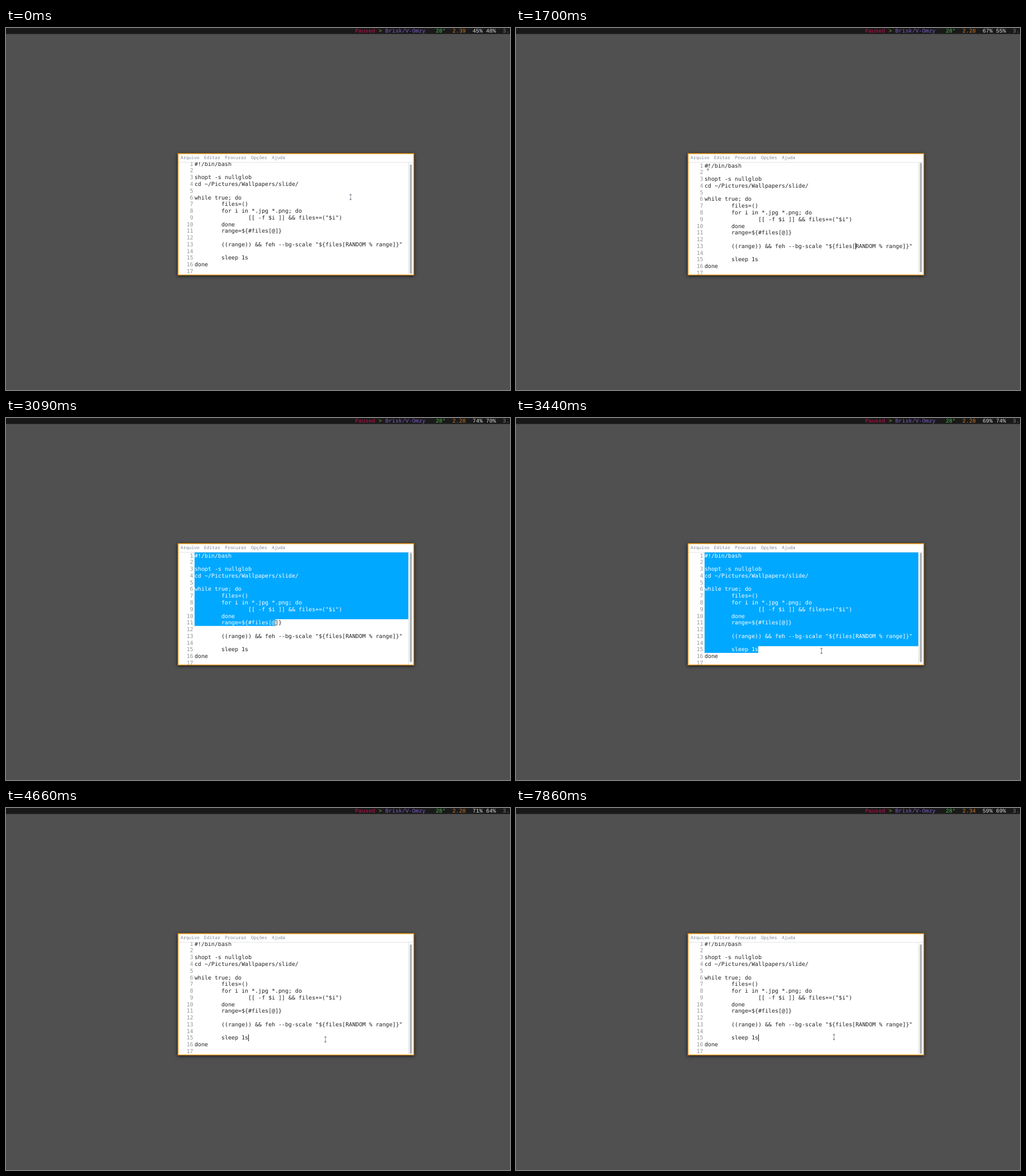
Write an HTML page with a canvas that moves like this. It is 882 by 635 pixels and loops after 8000 ms.

```html
<!DOCTYPE html>
<html lang="pt">
<head>
<meta charset="utf-8">
<title>Editor</title>
<style>
html, body { margin: 0; width: 100%; height: 100%; overflow: hidden; background: #505050; }
canvas { display: block; }
</style>
</head>
<body>
<canvas id="stage" width="882" height="635"></canvas>
<script>
const ctx = document.getElementById('stage').getContext('2d');
const LOOP = 8000;
const CODE_FONT = '9.75px "DejaVu Sans Mono", monospace';
const BAR_FONT = '9.78px "Liberation Mono", monospace';
const MENU_FONT = '7.85px "Noto Sans Mono", monospace';
const CELL = 5.87, LINE = 11.77, LEFT = 330, RIGHT = 704, TOP = 235.4;

const code = [
  '#!/bin/bash',
  '',
  'shopt -s nullglob',
  'cd ~/Pictures/Wallpapers/slide/',
  '',
  'while true; do',
  '        files=()',
  '        for i in *.jpg *.png; do',
  '                [[ -f $i ]] && files+=("$i")',
  '        done',
  '        range=${#files[@]}',
  '',
  '        ((range)) && feh --bg-scale "${files[RANDOM % range]}"',
  '',
  '        sleep 1s',
  'done',
  ''
];

const menu = [['Arquivo', 305.6], ['Editar', 346.6], ['Procurar', 383], ['Opções', 428.8], ['Ajuda', 465.2]];

// [time, load, cpu 1, cpu 2]
const stats = [
  [0, '2.39', 45, 48], [430, '2.39', 52, 51], [1430, '2.28', 67, 55], [2430, '2.28', 74, 70],
  [3440, '2.28', 69, 74], [4440, '2.28', 71, 64], [5430, '2.28', 63, 61],
  [6420, '2.34', 58, 66], [7430, '2.34', 59, 69]
];

// [time, x, y]
const path = [
  [110, 603, 296.5], [370, 594, 379], [690, 315.7, 262], [790, 320, 252], [1230, 320, 252],
  [1700, 335.8, 244.5], [2000, 330.8, 242], [2110, 330.8, 242], [2400, 334, 244],
  [2680, 360.5, 262], [2890, 405, 310], [3090, 471, 359], [3400, 530, 405],
  [3600, 552, 422], [3700, 555.5, 425], [3750, 555.5, 425], [3870, 559.7, 428],
  [4140, 559.7, 428], [4490, 559, 406], [5100, 559, 406], [5210, 559, 403.8],
  [5430, 559, 403.8], [5540, 558, 402.4], [5930, 558, 402.4], [5980, 557.4, 402],
  [7810, 557.4, 402], [7860, 556.5, 401.7]
];

const within = (t, a, b) => t >= a && t < b;

function pointerAt(t) {
  const i = path.findIndex(p => p[0] > t);
  if (i === 0) return path[0].slice(1);
  if (i < 0) return path[path.length - 1].slice(1);
  const [t0, x0, y0] = path[i - 1], [t1, x1, y1] = path[i];
  const k = (t - t0) / (t1 - t0);
  return [x0 + (x1 - x0) * k, y0 + (y1 - y0) * k];
}

function rect(x, y, w, h, color) {
  ctx.fillStyle = color;
  ctx.fillRect(x, y, w, h);
}

function text(s, x, y, color) {
  ctx.fillStyle = color;
  ctx.fillText(s, x, y);
}

function drawBar(t) {
  rect(0, 0, 882, 10.5, '#191919');
  const [, load, a, b] = stats.filter(s => s[0] <= t).pop();
  ctx.font = BAR_FONT;
  const put = (s, col, color) => text(s, 611 + col * CELL, 8.3, color);
  put('Paused', 0, '#c01253');
  put('>', 7, '#98a024');
  put('Brisk/V-Omzy', 9, '#7d5fc9');
  put('28°', 24, '#4fc04f');
  put(load, 29, '#d47a22');
  put(a + '% ' + b + '%', 35, '#dedede');
  put('3.', 44, '#808080');
}

function drawWindow(scrolled) {
  ctx.save();
  ctx.shadowColor = 'rgba(0,0,0,.75)';
  ctx.shadowBlur = 6;
  ctx.shadowOffsetY = 1;
  rect(300.4, 219.6, 413.8, 214.2, '#f39a1c');
  ctx.restore();
  rect(302, 221.2, 410.8, 211.3, '#fff');
  rect(302, 235, 410.8, 0.8, '#dcdcdc');
  ctx.font = MENU_FONT;
  for (const [s, x] of menu) text(s, x, 230.4, '#7c8594');
  rect(704, 235.5, 0.8, 197, '#dadada');
  ctx.fillStyle = '#b1b3b6';
  ctx.beginPath();
  ctx.roundRect(706.6, scrolled ? 239.3 : 236.4, 3.8, 191.8, 1.5);
  ctx.fill();
}

function drawLines(top, color) {
  ctx.font = CODE_FONT;
  code.forEach((s, i) => text(s, LEFT, top + i * LINE + 9.2, color));
}

function drawSelection(top, [x, y]) {
  const row = Math.max(0, Math.min(code.length - 1, Math.floor((y - top) / LINE)));
  const col = Math.max(0, Math.min(code[row].length, Math.round((x - LEFT) / CELL)));
  ctx.save();
  ctx.beginPath();
  ctx.rect(LEFT, top, RIGHT - LEFT, row * LINE);
  ctx.rect(LEFT, top + row * LINE, col * CELL, LINE);
  ctx.clip();
  rect(LEFT, top, RIGHT - LEFT, code.length * LINE, '#00a8ff');
  drawLines(top, '#fff');
  ctx.restore();
}

function drawEditor(t, scrolled, pointer) {
  const top = scrolled ? TOP - 2.9 : TOP;
  ctx.save();
  ctx.beginPath();
  ctx.rect(302, 235.6, 410.8, 196.8);
  ctx.clip();
  ctx.font = CODE_FONT;
  code.forEach((s, i) => {
    const n = String(i + 1);
    text(n, 327.7 - n.length * CELL, top + i * LINE + 9.2, '#979797');
  });
  drawLines(top, '#222');
  if (within(t, 2200, 4660)) drawSelection(top, pointer);
  const caret = (row, col) => rect(Math.round(LEFT + col * CELL), top + row * LINE, 1, LINE, '#222');
  if (within(t, 370, 950) || within(t, 1290, 2200)) caret(12, 45);
  if (within(t, 4660, 7080) || t >= 7480) caret(14, 16);
  ctx.restore();
}

function drawPointer([x, y]) {
  rect(x - 0.5, y - 4.5, 1, 9, '#9a9fa8');
  ctx.fillStyle = '#9a9fa8';
  for (const dy of [-4, 4]) {
    ctx.beginPath();
    ctx.arc(x, y + dy, 1.7, 0, Math.PI * 2);
    ctx.fill();
  }
}

function draw(t) {
  const scrolled = !within(t, 1480, 3550);
  const pointer = pointerAt(t);
  rect(0, 0, 882, 635, '#505050');
  drawBar(t);
  drawWindow(scrolled);
  drawEditor(t, scrolled, pointer);
  drawPointer(pointer);
}

ctx.textRendering = 'geometricPrecision';
const start = performance.now();
function tick() {
  draw((performance.now() - start) % LOOP);
  requestAnimationFrame(tick);
}
tick();
</script>
</body>
</html>
```
